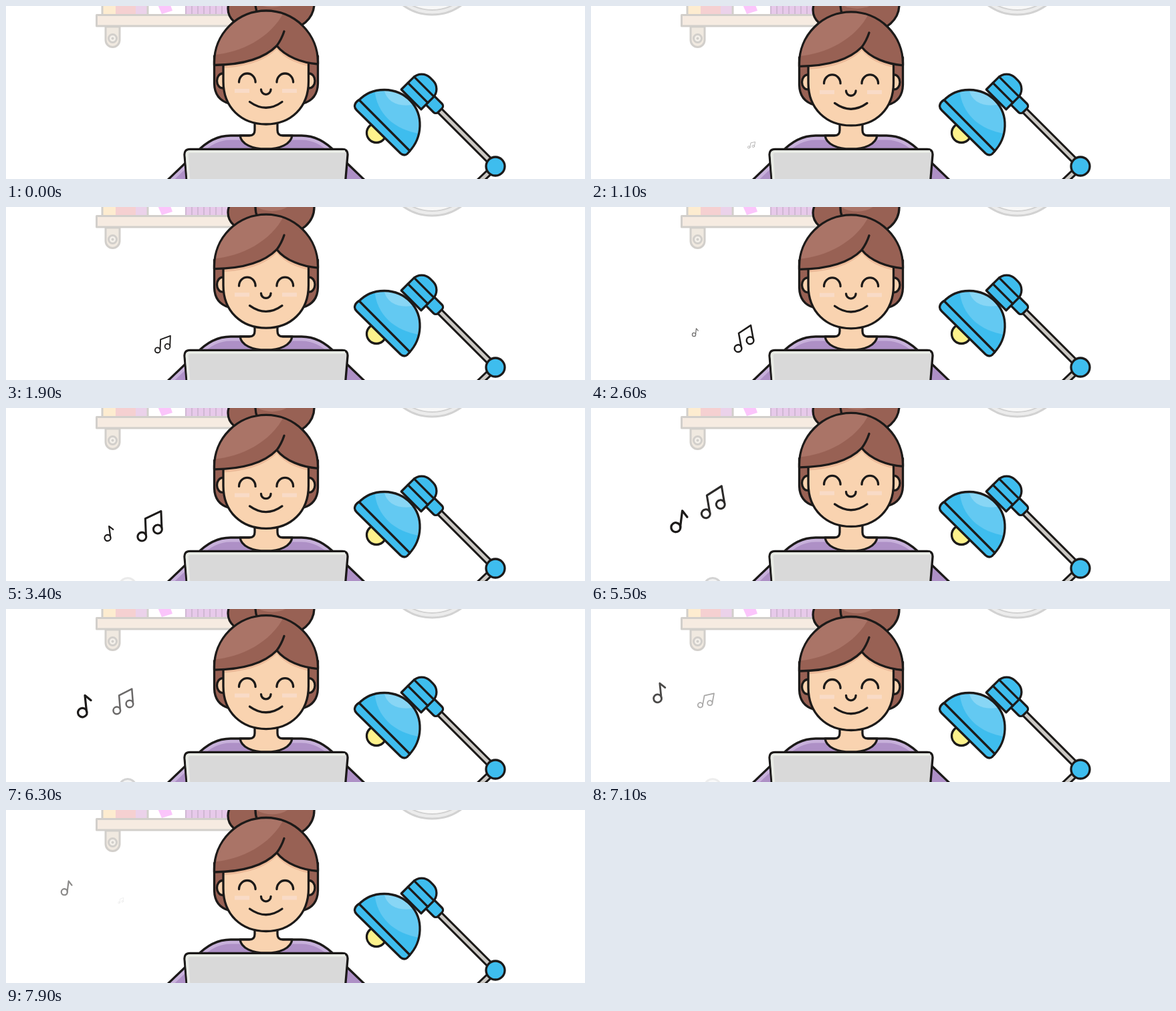
Animation, 866 px wide and 259 px high, one loop 8 s. Source, as an HTML page:

```html
<!DOCTYPE html>
<html lang="en">
<head>
<meta charset="utf-8">
<title>Listening to music</title>
<style>
html, body { margin: 0; width: 100%; height: 100%; overflow: hidden; background: #fff; }
svg { display: block; width: 866px; height: 259px; }
.ink { stroke: #1c1a19; stroke-width: 3.3; stroke-linecap: round; stroke-linejoin: round; }
.pale { stroke: #d2cfcb; stroke-width: 3; }
.line { fill: none; }
.hair { fill: #986154; }
.shine { fill: #aa7467; }
.skin { fill: #f9d3b0; }
.blue { fill: #3ebdee; }
</style>
</head>
<body>
<svg viewBox="0 0 866 259">
  <defs>
    <path id="fringe" d="M311.500 88.500V84A77.500 77 0 0 1 466.500 84V87C443 85 418 76 405 59.500C385 80 350 88 311.500 88.500Z"/>
    <path id="face" d="M325 50V113C325 152 352 177 389 177S452.500 152 452.500 113V50Z"/>
    <path id="dome" d="M527 142C548 119 585 121 605 142S623 197 603 218Z"/>
    <path id="shirt" d="M236 266L285 219Q308 194 336 194H442Q470 194 493 219L542 266Z"/>
    <ellipse id="bun" cx="417" cy="-4" rx="44" ry="40"/>
    <clipPath id="inFringe"><use href="#fringe"/></clipPath>
    <clipPath id="inFace"><use href="#face"/></clipPath>
    <clipPath id="inDome"><use href="#dome"/></clipPath>
    <clipPath id="inShirt"><use href="#shirt"/></clipPath>
    <clipPath id="inBun"><use href="#bun"/></clipPath>
  </defs>

  <!-- shelf -->
  <path fill="#fdecd0" d="M144 0h20v13h-20z"/>
  <path fill="#f5d0d1" d="M164 0h30v13h-30z"/>
  <path fill="#ebd2ea" d="M194 0h18v13h-18z"/>
  <path fill="#fbc5fb" d="M226-4L233 12L249 7L245-4Z"/>
  <path fill="#e7c9ea" d="M269 0h62v13h-62z"/>
  <path class="line" stroke="#d0b8d3" stroke-width="14" stroke-dasharray="2 7" d="M268 6H331"/>
  <path class="line pale" d="M144 0v13M212 0v13"/>
  <path class="pale" fill="#f0e9e0" d="M149 31H170V51a10.500 10.500 0 0 1-21 0Z"/>
  <circle class="pale" cx="159.500" cy="48.500" r="6" fill="#f4f0ea"/>
  <circle cx="159.500" cy="48.500" r="2" fill="#d2cfcb"/>
  <rect class="pale" x="135.500" y="13.500" width="210" height="16.500" fill="#f6ebe1" stroke-linejoin="round"/>

  <!-- clock -->
  <g stroke="#d2d2d2">
    <circle cx="637.500" cy="-61" r="74" fill="#ececec" stroke-width="3"/>
    <circle cx="637.500" cy="-61" r="67" fill="#f8f8f8" stroke-width="2"/>
  </g>

  <circle id="steam" cx="182" cy="267" r="12.500" fill="#f3f3f3" stroke="#d3d3d3" stroke-width="3"/>

  <!-- body -->
  <use href="#shirt" fill="#ae90c6"/>
  <path class="line" clip-path="url(#inShirt)" stroke="#c8b1db" stroke-width="13" d="M236 266L285 219Q308 194 336 194H442Q470 194 493 219"/>
  <use href="#shirt" class="ink line"/>
  <path class="skin ink" d="M350 194C352 207 368 214 389 214S426 207 428 194H414Q406 194 406 186V165H372V186Q372 194 364 194Z"/>

  <g id="head">
    <ellipse class="hair ink" cx="362" cy="4" rx="30" ry="27"/>
    <use href="#bun" class="hair"/>
    <ellipse class="shine" clip-path="url(#inBun)" cx="398" cy="-22" rx="34" ry="24"/>
    <use href="#bun" class="ink line"/>
    <path class="hair ink" d="M311.500 75V116Q312 140 334 146H444Q466 140 466.500 116V75Z"/>
    <ellipse class="skin ink" cx="324" cy="112" rx="8.500" ry="11"/>
    <ellipse class="skin ink" cx="453.500" cy="112" rx="8.500" ry="11"/>
    <use href="#face" class="skin"/>
    <g clip-path="url(#inFace)"><use href="#fringe" y="5" fill="#ecba98"/></g>
    <use href="#face" class="ink line"/>
    <use href="#fringe" class="hair"/>
    <path class="shine" clip-path="url(#inFringe)" d="M311 73C350 70 397 48 416 8L350 0L305 30Z"/>
    <use href="#fringe" class="ink line"/>
    <path class="ink line" d="M405 59.500Q412 50 416 38"/>
    <path fill="#f9dbc7" d="M342 124h22v6h-22zM413 124h22v6h-22z"/>
    <path class="ink line" d="M348.500 114a12.300 13 0 0 1 24.600 0M405 114a12.300 13 0 0 1 24.600 0M381.500 125a7.300 7.300 0 0 0 14.600 0M364.500 143.500Q389 161 413 143.500"/>
  </g>

  <!-- laptop -->
  <path class="ink" fill="#d9d9d9" d="M270.500 264L267 223Q266.500 214.500 275 214.500H503Q511.500 214.500 511 223L507.500 264Z"/>
  <path class="line" stroke="#e8ebe5" stroke-width="4" d="M273.500 262L270.500 223Q270.500 218 275 218H507"/>

  <!-- lamp -->
  <g class="line" stroke-linecap="round">
    <path d="M645 153L732 240L692 278" stroke="#1c1a19" stroke-width="11"/>
    <path d="M645 153L732 240L692 278" stroke="#cbc8c3" stroke-width="5"/>
  </g>
  <circle class="blue ink" cx="732" cy="240" r="14"/>
  <g class="blue ink" transform="translate(604 142) rotate(45)">
    <rect x="12" y="-31" width="30" height="18" rx="5"/>
    <path d="M-21-3V-28a18 18 0 0 1 18-18H3a18 18 0 0 1 18 18V-3Z"/>
    <path d="M-21-17H21M-21-30H21"/>
  </g>
  <circle class="ink" cx="554" cy="190" r="14.500" fill="#fdf28c"/>
  <use href="#dome" class="blue"/>
  <g clip-path="url(#inDome)">
    <path fill="#63c9f2" d="M551 120C552 160 580 187 625 192V110Z"/>
    <path fill="#88d6f5" d="M565 120C566 143 587 153 612 147V110Z"/>
  </g>
  <use href="#dome" class="ink line"/>
  <path class="blue ink" d="M521.500 150Q522 144 528 140.500L604 217L600 221.500Q595 225 590 220.500L524.500 156Q521.500 153 521.500 150Z"/>

  <!-- notes -->
  <g id="pair" class="ink line">
    <circle cx="-17" cy="20" r="7"/><circle cx="9" cy="9" r="7"/>
    <path d="M-10.400 18V-9L15.600-20V7"/>
  </g>
  <g id="single" class="ink line">
    <circle cx="-4" cy="12" r="7"/><path d="M2.500 11V-14L11-5.500"/>
  </g>
</svg>
<script>
const el = id => document.getElementById(id);
const LOOP = 8000, STEP = 100, LIFE = 7500, SWAY = 3000;

const clamp = v => Math.min(1, Math.max(0, v));
const wave = (t, period, peak = 0) => Math.cos(2 * Math.PI * (t - peak) / period);

// Soft S-curve between two values: mid is its halfway time, width its slowness
const glide = (t, from, to, mid, width) => from + (to - from) / (1 + Math.exp((mid - t) / width));

// A note grows and shrinks over its life, fading in quickly and out slowly
function drawNote(id, age, x, y, turn) {
  const scale = Math.sin(Math.PI * clamp(age / LIFE)) ** .8;
  const opacity = clamp(age / 1100) * clamp((LIFE - age) / 2900);
  el(id).setAttribute("transform", `translate(${x} ${y}) rotate(${turn}) scale(${scale})`);
  el(id).setAttribute("opacity", opacity);
}

function draw(now) {
  const t = Math.floor(now % LOOP / STEP) * STEP;
  el("head").setAttribute("transform", `translate(0 ${2.4 * (1 - wave(t, 5000))})`);
  el("steam").setAttribute("opacity", clamp((t - 2800) / 1300) - clamp((t - 6300) / 1300));
  drawNote("pair", t - 700, glide(t, 245, 171, 3970, 1000), glide(t, 209, 135, 3450, 610), 11 * wave(t, SWAY, 4250));
  drawNote("single", t - 1900, glide(t, 158, 78, 6250, 1000), glide(t, 187, 112, 6100, 580), 9 * wave(t, SWAY, 5200));
  requestAnimationFrame(draw);
}
requestAnimationFrame(draw);
</script>
</body>
</html>
```
